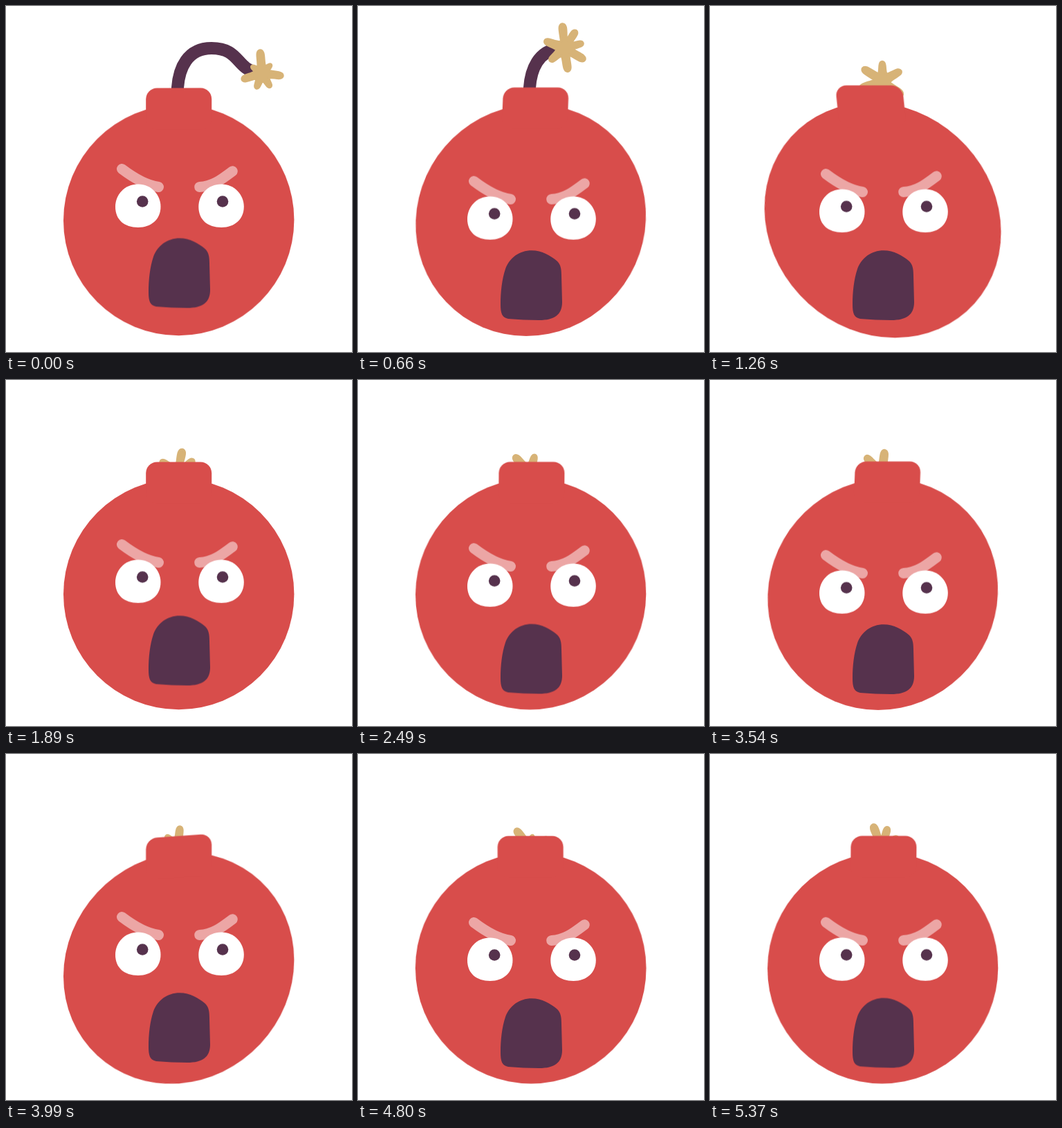
An HTML page for the animation above (5.4 s loop, 500 by 500 pixels).

```html
<!DOCTYPE html>
<html lang="en">
<head>
<meta charset="utf-8">
<title>Angry bomb</title>
<style>
  html, body { margin: 0; width: 100%; height: 100%; overflow: hidden; background: #fff; }
  svg { display: block; width: 100vw; height: 100vh; }
  .fuse { fill: none; stroke: #56324d; stroke-width: 18; }
  .spark { fill: #d7b377; stroke: #d7b377; stroke-width: 4; stroke-linejoin: round; }
  .body { fill: #d84d4b; transform-origin: 250px 310px; animation: wobble 360ms infinite; }
  .eyes { fill: #fff; animation: glare 360ms linear infinite; }
  .mouth { fill: #56324d; animation: scream 360ms linear infinite; }
  .brow { fill: none; stroke: #fff; stroke-opacity: .5; stroke-width: 15; stroke-linecap: round; }
  .pupil { fill: #56324d; }

  /* Sine swings: ease out towards each peak, ease in on the way back. */
  @keyframes wobble {
    0%, 25%, 33.33%, 66.67% { transform: none; animation-timing-function: cubic-bezier(.61, 1, .88, 1); }
    12.5%, 50%, 83.33% { animation-timing-function: cubic-bezier(.12, 0, .39, 0); }
    12.5% { transform: skewY(-4.6deg); }
    50% { transform: skewX(6deg) scale(1.02); }
    83.33% { transform: skewX(-2.3deg) scale(.997, 1.004); }
    100% { transform: none; }
  }
  @keyframes glare {
    0%, 8.33%, 100% { transform: none; }
    25% { transform: translateY(2px); }
    33.33% { transform: translateY(8px); }
    66.67% { transform: translateY(6.5px); }
    83.33% { transform: translateY(18px); }
    91.67% { transform: translateY(8px); }
  }
  @keyframes scream {
    0%, 100% { transform: none; }
    8.33% { transform: translateY(10px); }
    25% { transform: translateY(5px); }
    33.33%, 91.67% { transform: translateY(18px); }
  }
</style>
</head>
<body>
<svg viewBox="0 0 500 500">
  <path class="fuse" id="fuse" d="M370 97C331 95 341 61 297 61C262 61 250 90 248 118V135"/>
  <path class="spark" id="spark"/>
  <g class="body">
    <circle cx="249.7" cy="309.5" r="166.7"/>
    <rect x="202.2" y="118.5" width="95" height="60" rx="16"/>
  </g>
  <g class="eyes">
    <path class="brow" d="M167.5 235.5C184 248 202 259 220.5 261.5M279.7 261.5C298 261 311 251 327.3 238.7"/>
    <path id="eye" d="M191 257.5C210 257.5 223.5 273 223.5 290C223.5 308 210 320 191 320C171 320 158 309 158 290C158 273 171 257.5 191 257.5Z"/>
    <use href="#eye" x="120.3"/>
    <circle class="pupil" cx="197.2" cy="282.5" r="8.3"/>
    <circle class="pupil" cx="313" cy="282.5" r="8.3"/>
  </g>
  <path class="mouth" d="M251 335.3C266 335.3 278 343 287 350C293 355 294 362 294 372L295 410C295 428 284 436 262 436C246 436 232 435 217 434C208 432 206 426 206 413C206 395 208 377 213 362C219 346 233 335.3 251 335.3Z"/>
</svg>
<script>
  const LOOP = 5400, STEP = 30, SPEED = 0.126, LOBES = 7;
  const fuse = document.getElementById('fuse');
  const spark = document.getElementById('spark');
  const length = fuse.getTotalLength();
  fuse.setAttribute('stroke-dasharray', `${length} ${length}`);

  const polar = (radius, degrees) => {
    const a = degrees * Math.PI / 180;
    return `${radius * Math.cos(a)} ${radius * Math.sin(a)}`;
  };

  // A ring of rounded lobes; their lengths follow a cosine, lean bunches them to one side.
  function burst(mean, swing, waves, lean) {
    const angle = i => -95 + i * 360 / LOBES - lean * Math.sin(Math.PI * i / LOBES);
    const valley = i => polar(11, (angle(i) + angle(i + 1)) / 2);
    let path = 'M' + valley(-1);
    for (let i = 0; i < LOBES; i++) {
      const reach = mean + swing * Math.cos(2 * Math.PI * i * waves / LOBES);
      const tip = angle(i);
      path += `C${polar(reach * 0.6, tip - 9)} ${polar(reach, tip - 12)} ${polar(reach, tip)}`
            + `C${polar(reach, tip + 12)} ${polar(reach * 0.6, tip + 9)} ${valley(i)}`;
    }
    return path + 'Z';
  }
  const bursts = [burst(25, 8, 3, 0), burst(31, 4, 2, 30)];

  // The spark flickers along the fuse, then keeps burning behind the cap.
  function draw(time) {
    const step = Math.floor((time % LOOP) / STEP + 0.05);
    const burnt = Math.min(step * STEP * SPEED, length);
    const { x, y } = fuse.getPointAtLength(burnt);
    fuse.setAttribute('stroke-dashoffset', -Math.min(burnt + 8, length));
    spark.setAttribute('d', bursts[(step >> 1) % 2]);
    spark.setAttribute('transform', `translate(${x} ${y}) rotate(${step * 360 * 7 / 22})`);
  }

  const start = performance.now();
  function tick() {
    draw(performance.now() - start);
    requestAnimationFrame(tick);
  }
  tick();
</script>
</body>
</html>
```
